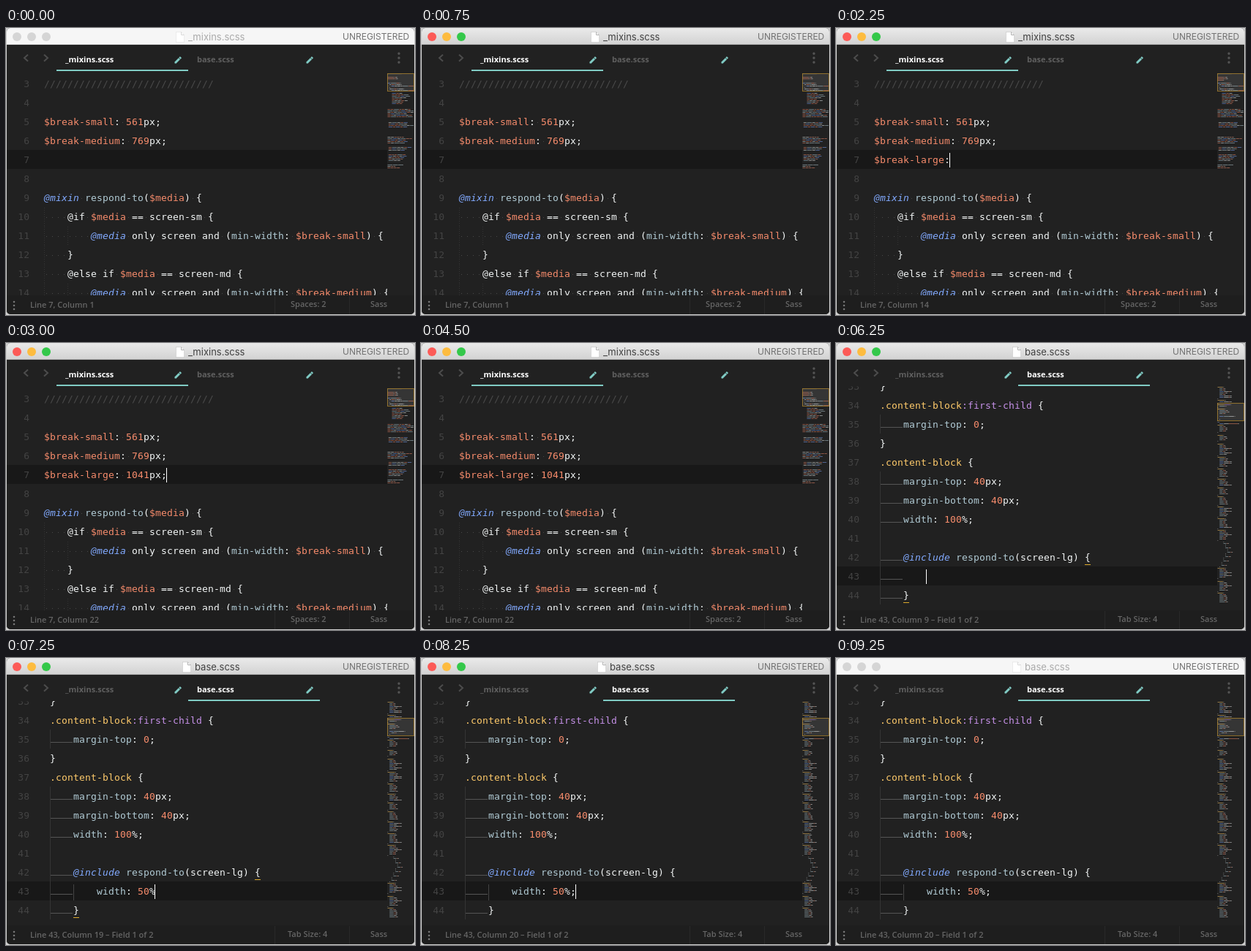
Write an HTML page with a canvas that moves like this. It is 559 px wide and 393 px high and loops after 9.5 s.

```html
<!DOCTYPE html>
<html lang="en">
<head>
<meta charset="utf-8">
<title>Editor snippet demo</title>
<style>
html, body { margin: 0; width: 100%; height: 100%; overflow: hidden; background: #d2d2d2; }
canvas { display: block; width: 559px; height: 393px; }
</style>
</head>
<body>
<canvas id="stage" width="559" height="393"></canvas>
<script>
const ctx = document.getElementById('stage').getContext('2d');
const LOOP = 9500, ROW = 26, CELL = 8;
const MONO = '13px "DejaVu Sans Mono", monospace';
const UI = '600 11px "Open Sans", "Noto Sans", sans-serif';
const TAB_FONT = '700 11px "Open Sans", "Noto Sans", sans-serif';
const TEAL = '#80cbc4', BG = '#212121';

const TOKENS = /(\/{3,})|(@mixin|@media|@include|\bh1\b)|(\$[\w-]+|\$|\b\d+)|(\.[a-z][\w-]*)|(:first-child)|(respond-to|[a-z][\w-]*(?=:))|([\w-]+)|(\s+)|(.)/g;
const COLORS = ['#4a4a4a', '#82aaff', '#f78c6c', '#ffcb6b', '#c792ea', '#b2ccd6', '#f4f7f7', null, '#f4f7f7'];

function tokenize(text) {
  return [...text.matchAll(TOKENS)].map(m => {
    const kind = m.slice(1).findIndex(g => g !== undefined);
    return { text: m[0], col: m.index, kind, color: COLORS[kind] };
  });
}

// Value of the last step that has begun by time t
function stepAt(t, steps) {
  return steps.filter(s => s[0] <= t).pop()[1];
}

function seeded(seed) {
  return () => (seed = (seed * 16807) % 2147483647) / 2147483647;
}

function rect(x, y, w, h, color) {
  ctx.fillStyle = color;
  ctx.fillRect(x, y, w, h);
}

function dot(x, y, r, color) {
  ctx.fillStyle = color;
  ctx.beginPath();
  ctx.arc(x, y, r, 0, 7);
  ctx.fill();
}

function label(text, x, y, font, color, align = 'left') {
  ctx.font = font;
  ctx.fillStyle = color;
  ctx.textAlign = align;
  ctx.fillText(text, x, y);
}

function path(points, color, width) {
  ctx.strokeStyle = color;
  ctx.lineWidth = width;
  ctx.beginPath();
  points.forEach(([x, y]) => ctx.lineTo(x, y));
  ctx.stroke();
}

// ---- Documents ----
const mixinHead = ['', '', '/'.repeat(29), '', '$break-small: 561px;', '$break-medium: 769px;'];
const mixinBody = [
  '',
  '@mixin respond-to($media) {',
  '    @if $media == screen-sm {',
  '        @media only screen and (min-width: $break-small) {',
  '    }',
  '    @else if $media == screen-md {',
  '        @media only screen and (min-width: $break-medium) {'
];
const baseHead = [
  '}',
  '.content-block:first-child {',
  '    margin-top: 0;',
  '}',
  '.content-block {',
  '    margin-top: 40px;',
  '    margin-bottom: 40px;',
  '    width: 100%;',
  ''
];

function mixinTail() {
  const bands = [[16, 23, 9, 44], [27, 32, 0, 54], [36, 39, 2, 50], [46, 50, 0, 54], [53, 55, 2, 52], [58, 62, 2, 38], [65, 67, 0, 24]];
  const words = ['$width ', 'min-width: ', '@include ', '100% ', 'screen ', '$size '];
  const rnd = seeded(41), lines = [];
  for (let n = 15; n < 68; n++) {
    const band = bands.find(b => n >= b[0] && n <= b[1]);
    let text = '';
    if (band) {
      const end = band[3] * (0.55 + rnd() * 0.45);
      text = ' '.repeat(band[2]);
      while (text.length < end) text += words[Math.floor(rnd() * words.length)];
    }
    lines.push(text);
  }
  return lines;
}

function sheet(count, seed) {
  const props = ['margin-top: 40px;', 'width: 100%;', 'color: $dark;', 'padding: 0 20px;', '@include font-size(18px);', 'display: block;'];
  const rnd = seeded(seed), lines = [];
  while (lines.length < count) {
    const n = lines.length;
    if (n > 72 && n < 98) {
      const depth = Math.round(5 - Math.abs(n - 86) / 3);
      lines.push(' '.repeat(depth * 4) + (n % 3 ? '}' : 'width: 50%;'));
      continue;
    }
    lines.push('.block-' + 'item'.repeat(1 + rnd() * 2) + ' {');
    for (let i = 2 + rnd() * 5; i > 0; i--) lines.push('    ' + props[Math.floor(rnd() * props.length)]);
    lines.push('}');
    if (rnd() < 0.4) lines.push('');
  }
  return lines.slice(0, count);
}

const mixinRest = mixinBody.concat(mixinTail());
const baseBefore = sheet(11, 7);
const baseAfter = ['}', 'h1 {', '    @include font-size($heading-large-size);'].concat(sheet(122, 93));

// ---- Timeline ----
const MIX_TYPED = [[0, ''], [1500, '$br'], [1750, '$break-'], [2250, '$break-large:'], [2500, '$break-large: 1'], [2750, '$break-large: 1041p'], [3000, '$break-large: 1041px;']];
const BASE_TYPED = [[0, ''], [5750, 'l'], [6000, 'lg'], [6250, ''], [6500, 'w'], [6750, 'wid'], [7000, 'width: 5'], [7250, 'width: 50%'], [7500, 'width: 50%;']];
const CARET = [[0, 0], [250, 1], [500, 0], [1000, 1], [3500, 0], [4000, 1], [4500, 0], [4750, 1], [5250, 0], [5750, 1], [8000, 0], [8250, 1], [8750, 0]];

function sceneAt(t) {
  const scene = { active: t >= 250 && t < 9250, caret: stepAt(t, CARET) };
  if (t < 4750) {
    const typed = stepAt(t, MIX_TYPED);
    return { ...scene, tab: 0, first: 1, top: 11, x: 52, line: 7, col: typed.length, miniY: 59, boxY: 62,
      lines: [...mixinHead, typed, ...mixinRest],
      status: `Line 7, Column ${typed.length + 1}`, indent: 'Spaces: 2' };
  }
  const typed = stepAt(t, BASE_TYPED), open = t >= 6250;
  const body = open
    ? ['    @include respond-to(screen-lg) {', '        ' + typed, '    }']
    : ['    ' + typed];
  const line = open ? 43 : 42, col = (open ? 8 : 4) + typed.length;
  let marks = open ? [[42, 35], [44, 4]] : [[37, 15], [43, 0]];
  if (t >= 7500) marks = [];
  return { ...scene, tab: 1, first: 22, top: -240, x: 60, line, col, marks, open, typed, miniY: 60, boxY: 82,
    lines: [...baseBefore, ...baseHead, ...body, ...baseAfter],
    status: `Line ${line}, Column ${col + 1}` + (open ? ' – Field 1 of 2' : ''), indent: 'Tab Size: 4' };
}

// ---- Drawing ----
function drawCode(s) {
  const rowTop = n => s.top + (n - s.first) * ROW + 0;
  rect(1, rowTop(s.line), 520, ROW, '#181818');
  const from = s.tab ? 33 : 3;
  for (let n = from; n < from + 13; n++) {
    const y = rowTop(n), text = s.lines[n - s.first];
    label(n, 32, y + 18, MONO, '#434343', 'right');
    ctx.letterSpacing = '0.174px';
    for (const k of tokenize(text)) {
      const x = s.x + k.col * CELL;
      if (k.color) label(k.text, x, y + 18, (k.kind === 1 ? 'italic ' : '') + MONO, k.color);
      else if (!s.tab) for (let i = 0; i < k.text.length; i++) rect(x + i * CELL + 3, y + 14, 1, 1, '#484848');
    }
    ctx.letterSpacing = '0px';
    const indented = text.startsWith('    ');
    if (s.tab && indented) rect(61, y + 17, 30, 1, '#555');
    if (!s.tab && n > 9) {
      for (let d = 1; d < ROW; d += 3) {
        rect(52, y + d, 1, 1, '#343434');
        if (text.startsWith('        ')) rect(84, y + d, 1, 1, '#343434');
      }
    }
    if (s.tab && (indented || n === 41)) rect(60, y, 1, ROW, '#343434');
    if (s.open && n === 43 && s.typed) rect(92, y + 4, 1, 22, '#444');
  }
  for (const [n, col] of s.marks || []) rect(s.x + col * CELL, rowTop(n) + 23, 8, 1, '#dba92c');
  if (s.caret && s.active) rect(s.x - 1 + s.col * CELL, rowTop(s.line) + 4, 1, 20, '#fff');
}

function drawMinimap(s) {
  rect(521, 59, 37, 307, BG);
  rect(521, s.boxY, 36, 24, '#353535');
  ctx.save();
  ctx.beginPath();
  ctx.rect(521, 59, 36, 307);
  ctx.clip();
  ctx.globalAlpha = 0.5;
  s.lines.forEach((text, i) => {
    for (const k of tokenize(text)) {
      if (k.color) rect(521.5 + k.col * 0.667, s.miniY + i * 2, k.text.length * 0.667, 1, k.color);
    }
  });
  ctx.restore();
  ctx.strokeStyle = 'rgba(220,165,45,.55)';
  ctx.lineWidth = 1;
  ctx.strokeRect(521.5, s.boxY + 0.5, 36, 24);
}

function drawTitle(s) {
  const fill = ctx.createLinearGradient(0, 0, 0, 22);
  fill.addColorStop(0, s.active ? '#eaeaea' : '#f6f6f6');
  fill.addColorStop(1, s.active ? '#d3d3d3' : '#f6f6f6');
  rect(1, 0, 557, 22, fill);
  rect(1, 22, 557, 1, s.active ? '#aaa' : '#cfcfcf');
  ['#fc5b57', '#fdbc40', '#34c84a'].forEach((color, i) => dot(15 + i * 20, 12, 6, s.active ? color : '#d5d5d5'));

  const x = s.tab ? 241 : 232;
  const page = [[x + 0.5, 5.5], [x + 7.5, 5.5], [x + 11.5, 9.5], [x + 11.5, 19.5], [x + 0.5, 19.5], [x + 0.5, 5.5]];
  const edge = s.active ? '#b0b0b0' : '#d8d8d8';
  path(page, edge, 1);
  ctx.fillStyle = '#fff';
  ctx.fill();
  path([[x + 7.5, 5.5], [x + 7.5, 9.5], [x + 11.5, 9.5]], edge, 1);
  label(s.tab ? 'base.scss' : '_mixins.scss', x + 17, 17, '13px Inter, sans-serif', s.active ? '#404040' : '#aaa');
  label('UNREGISTERED', 460, 16, '12px Inter, sans-serif', '#727272');
}

function pencil(x, y) {
  path([[x - 3, y + 3], [x + 2, y - 2]], TEAL, 3);
  path([[x + 2.4, y - 2.4], [x + 4, y - 4]], TEAL, 3);
  rect(x - 4.5, y + 2, 2.5, 2.5, TEAL);
}

function drawTabs(s) {
  rect(1, 23, 557, 36, BG);
  path([[30, 36.5], [25, 41], [30, 45.5]], '#4c4c4c', 2);
  path([[52, 36.5], [57, 41], [52, 45.5]], '#4c4c4c', 2);
  ['_mixins.scss', 'base.scss'].forEach((name, i) => {
    label(name, 81 + i * 180, 47, TAB_FONT, i === s.tab ? '#fff' : '#606060');
    pencil(235 + i * 180, 44);
  });
  rect(69 + s.tab * 180, 57, 180, 2, TEAL);
  for (const y of [35, 41, 47]) dot(537, y, 1.7, '#555');
}

function drawStatus(s) {
  rect(1, 366, 557, 27, '#1e1e1e');
  for (const y of [375, 380, 385]) dot(11, y, 1.3, '#777');
  for (const x of [367, 469]) rect(x, 367, 1, 25, '#292929');
  label(s.status, 33, 383, UI, '#666');
  label(s.indent, s.tab ? 385 : 389, 382, UI, '#666');
  label('Sass', 498, 382, UI, '#666');
}

function draw(t) {
  const s = sceneAt(t);
  rect(0, 0, 559, 393, '#d2d2d2');
  ctx.save();
  ctx.beginPath();
  ctx.roundRect(1, 0, 557, 392, 5);
  ctx.clip();
  rect(0, 0, 559, 393, BG);
  drawCode(s);
  drawMinimap(s);
  drawTabs(s);
  drawStatus(s);
  drawTitle(s);
  ctx.restore();
}

const start = performance.now();
function tick() {
  draw((performance.now() - start) % LOOP);
  requestAnimationFrame(tick);
}
tick();
</script>
</body>
</html>
```
